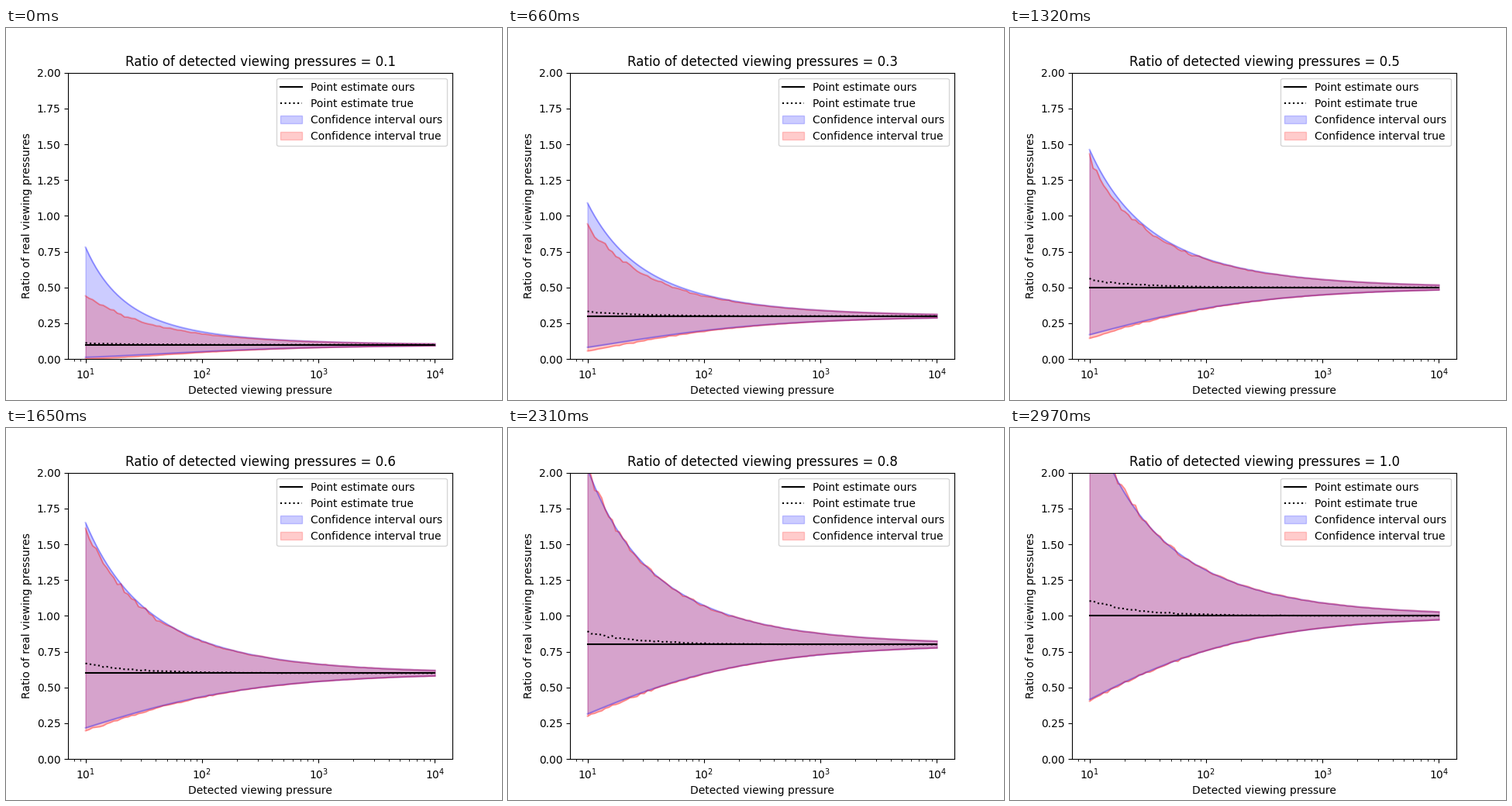
These frames come from a looping animation (640 px wide and 480 px high, 3300 ms). A matplotlib script:

```python
import matplotlib.pyplot as plt
import numpy as np
from matplotlib.animation import FuncAnimation

FRAMES, INTERVAL = 10, 330
SAMPLES = 10_000
Z = 1.96

pressure = np.logspace(1, 4, 100)
fig, ax = plt.subplots(figsize=(6.4, 4.8), dpi=100)


def log_interval(ratio):
    """Normal approximation of the interval for the log of the ratio."""
    spread = np.exp(Z * np.sqrt(1 / pressure + 1 / (ratio * pressure)))
    return ratio / spread, ratio * spread


def simulated_interval(ratio, seed):
    """Mean and 95 % interval of a ratio of two gamma variables."""
    rng = np.random.default_rng(seed)
    size = (SAMPLES, len(pressure))
    ratios = rng.gamma(ratio * pressure, size=size) / rng.gamma(pressure, size=size)
    low, high = np.percentile(ratios, [2.5, 97.5], axis=0)
    return ratios.mean(axis=0), low, high


def draw_band(low, high, color, label):
    ax.fill_between(pressure, low, high, color=color, alpha=0.2, label=label)
    for bound in (low, high):
        ax.plot(pressure, bound, color=color, alpha=0.25)


def draw(frame):
    ratio = (frame + 1) / 10
    mean, low, high = simulated_interval(ratio, frame)

    ax.clear()
    ax.plot(pressure, np.full_like(pressure, ratio), "k-",
            label="Point estimate ours", zorder=3)
    ax.plot(pressure, mean, "k:", label="Point estimate true", zorder=3)
    draw_band(*log_interval(ratio), "blue", "Confidence interval ours")
    draw_band(low, high, "red", "Confidence interval true")

    ax.set_xscale("log")
    ax.set_ylim(0, 2)
    ax.set_xlabel("Detected viewing pressure")
    ax.set_ylabel("Ratio of real viewing pressures")
    ax.set_title(f"Ratio of detected viewing pressures = {ratio:.1f}")
    ax.legend(loc="upper right")


animation = FuncAnimation(fig, draw, frames=FRAMES, interval=INTERVAL,
                          repeat=True, repeat_delay=0)
plt.show()
```
